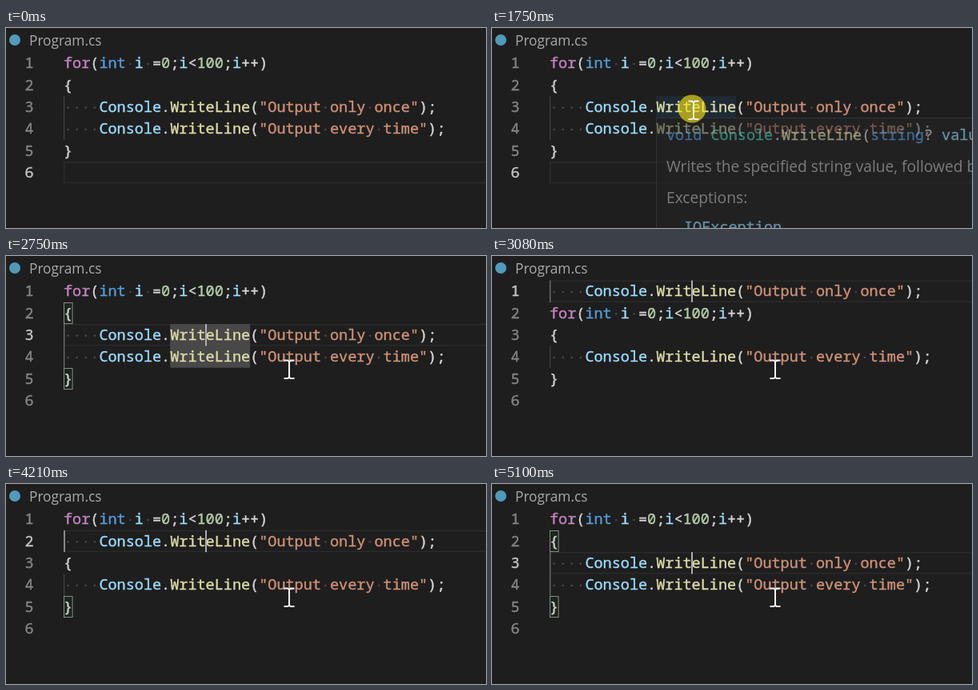
An HTML page with a canvas that plays this animation: 600x250 px, repeating every 5430 ms.

```html
<!DOCTYPE html>
<html lang="en">
<head>
<meta charset="utf-8">
<title>Moving a line of code</title>
<style>
  html, body { margin: 0; width: 100%; height: 100%; overflow: hidden; background: #1e1e1e; }
  canvas { display: block; width: 600px; height: 250px; }
</style>
</head>
<body>
<canvas></canvas>
<script>
const LOOP = 5430;
const LEFT = 72, TOP = 30.5, ROW = 27.3;
const MONO = '18.5px "Noto Sans Mono", "DejaVu Sans Mono", monospace';
const sans = size => `${size}px "Open Sans", "Noto Sans", sans-serif`;

const KEYWORD = '#569cd6', FLOW = '#c586c0', NAME = '#9cdcfe', CALL = '#dcdcaa',
      TEXT = '#ce9178', NUMBER = '#b5cea8', TYPE = '#4ec9b0', PLAIN = '#d4d4d4';

const callLine = message => [
  ['    ', PLAIN], ['Console', NAME], ['.', PLAIN], ['WriteLine', CALL],
  ['(', PLAIN], [`"${message}"`, TEXT], [');', PLAIN]
];
const LOOP_HEAD = [
  ['for', FLOW], ['(', PLAIN], ['int', KEYWORD], [' ', PLAIN], ['i', NAME], [' =', PLAIN],
  ['0', NUMBER], [';', PLAIN], ['i', NAME], ['<', PLAIN], ['100', NUMBER], [';', PLAIN],
  ['i', NAME], ['++)', PLAIN]
];
const ONCE = callLine('Output only once');
const EVERY = callLine('Output every time');
const OTHERS = [LOOP_HEAD, [['{', PLAIN]], EVERY, [['}', PLAIN]], []];
const SIGNATURE = [
  ['void ', KEYWORD], ['Console', TYPE], ['.', PLAIN], ['WriteLine', CALL], ['(', PLAIN],
  ['string', KEYWORD], ['? ', PLAIN], ['value', NAME]
];

// start time, row of the moved line, whether the bracket boxes on rows 2 and 5 show
const MOVES = [
  [0, 3, false], [1820, 3, true], [2950, 2, true], [3080, 1, false],
  [3540, 2, false], [3740, 3, false], [3810, 3, true],
  [4210, 2, true], [4290, 2, false], [4360, 1, false],
  [4830, 2, false], [5030, 3, false], [5100, 3, true]
];

const canvas = document.querySelector('canvas');
const ctx = canvas.getContext('2d');
const scale = window.devicePixelRatio || 1;
canvas.width = 600 * scale;
canvas.height = 250 * scale;
ctx.font = MONO;
const CHAR = ctx.measureText('0').width;

const rowTop = row => TOP + (row - 1) * ROW;
const column = n => LEFT + n * CHAR;
const within = (t, from, to) => t >= from && t < to;

function rect(x, y, w, h, color) {
  ctx.fillStyle = color;
  ctx.fillRect(x, y, w, h);
}

function outline(x, y, w, h, color, width = 1) {
  ctx.strokeStyle = color;
  ctx.lineWidth = width;
  ctx.strokeRect(x, y, w, h);
}

function disc(x, y, r, color) {
  ctx.fillStyle = color;
  ctx.beginPath();
  ctx.arc(x, y, r, 0, Math.PI * 2);
  ctx.fill();
}

function write(text, x, y, color, font = MONO) {
  ctx.font = font;
  ctx.fillStyle = color;
  ctx.fillText(text, x, y);
  if (font !== MONO) return;
  // slightly heavier code text
  ctx.strokeStyle = color;
  ctx.lineWidth = 0.4;
  ctx.strokeText(text, x, y);
}

function writeTokens(tokens, x, y, dots) {
  for (const [text, color] of tokens) {
    write(text, x, y, color);
    if (dots) [...text].forEach((c, i) => {
      if (c === ' ') disc(x + (i + 0.5) * CHAR, y - 5.3, 1.3, '#464747');
    });
    x += text.length * CHAR;
  }
}

// Pointer positions advance in steps, like a screen recording.
function pointerAt(t) {
  if (t < 530) return null;
  if (t < 600) return [529, 236];
  if (t < 670) return [440, 193];
  if (t < 940) return [366, 158.5];
  if (t < 1880) {
    const p = Math.min(7, Math.floor((t - 940) / 68.5)) / 7;
    const e = p * (1.4 - 0.4 * p);
    return [353 - 101 * e, 148 - 45 * e];
  }
  const p = Math.min(5, Math.floor((t - 1880) / 68) + 1) / 5;
  const e = p * p * (3 - 2 * p);
  return [252 + 102 * e, 103 + 39 * e];
}

function drawPointer([x, y]) {
  ctx.beginPath();
  for (const side of [-1, 1]) {
    ctx.moveTo(x + side * 6.5, y - 11.5);
    ctx.lineTo(x + side * 2, y - 11.5);
    ctx.lineTo(x, y - 10);
    ctx.lineTo(x, y + 10);
    ctx.lineTo(x + side * 2, y + 11);
    ctx.lineTo(x + side * 6.5, y + 11);
  }
  ctx.strokeStyle = '#f4f4f4';
  ctx.lineWidth = 2;
  ctx.stroke();
}

function drawTooltip() {
  ctx.save();
  ctx.globalAlpha = 0.53;
  rect(205, 112, 400, 150, '#252526');
  outline(205.5, 112.5, 400, 150, '#454545');
  writeTokens(SIGNATURE, 218, 140);
  write('Writes the specified string value, followed by', 218, 180, '#cccccc', sans(19.2));
  write('Exceptions:', 218, 219, '#cccccc', sans(19.2));
  write('IOException', 240, 254.5, NAME);
  ctx.restore();
}

function drawCode(t) {
  const [, moved, boxed] = MOVES.findLast(([start]) => t >= start);
  const active = t < 1820 ? 6 : moved;
  const lines = [...OTHERS];
  lines.splice(moved - 1, 0, ONCE);

  outline(LEFT + 0.75, rowTop(active) + 0.75, 540, ROW - 1.5, '#2a2a2a', 1.5);
  if (within(t, 1750, 1820)) rect(column(12), rowTop(3), 9 * CHAR, ROW, '#202a35');
  if (within(t, 2080, 2950)) rect(column(12), rowTop(3), 9 * CHAR, 2 * ROW, '#484848');

  lines.forEach((tokens, i) => {
    const row = i + 1, top = rowTop(row), base = top + 19.8;
    if (tokens === ONCE || tokens === EVERY) {
      const lit = row === active || (active === 3 && row === 4);
      rect(LEFT, top, 1.3, ROW, lit ? '#707070' : '#404040');
    }
    if (boxed && (row === 2 || row === 5)) {
      // a box whose bracket has moved away collapses to a bar
      const width = tokens === ONCE ? 1 : CHAR - 0.5;
      rect(LEFT, top, width, ROW, 'rgba(0, 100, 0, 0.1)');
      outline(LEFT + 0.5, Math.round(top) + 0.5, width, ROW - 1.3, '#888888');
    }
    write(row, 23.5, base, row === active ? '#c6c6c6' : '#858585');
    writeTokens(tokens, LEFT, base, true);
  });

  if (t >= 1820 && !within(t, 2290, 2750)) rect(249, rowTop(moved), 2, ROW, '#aeafad');
}

function draw(t) {
  ctx.setTransform(scale, 0, 0, scale, 0, 0);
  rect(0, 0, 600, 250, '#1e1e1e');
  disc(11, 15, 7, '#519aba');
  write('Program.cs', 29, 22, '#a9a9a9', sans(17.3));
  drawCode(t);
  if (within(t, 1750, 1820)) {
    drawTooltip();
    disc(250, 101, 17.5, 'rgba(242, 226, 20, 0.64)');
  }
  const pointer = pointerAt(t);
  if (pointer) drawPointer(pointer);
}

const start = performance.now();
function tick() {
  draw((performance.now() - start) % LOOP);
  requestAnimationFrame(tick);
}
tick();
</script>
</body>
</html>
```
